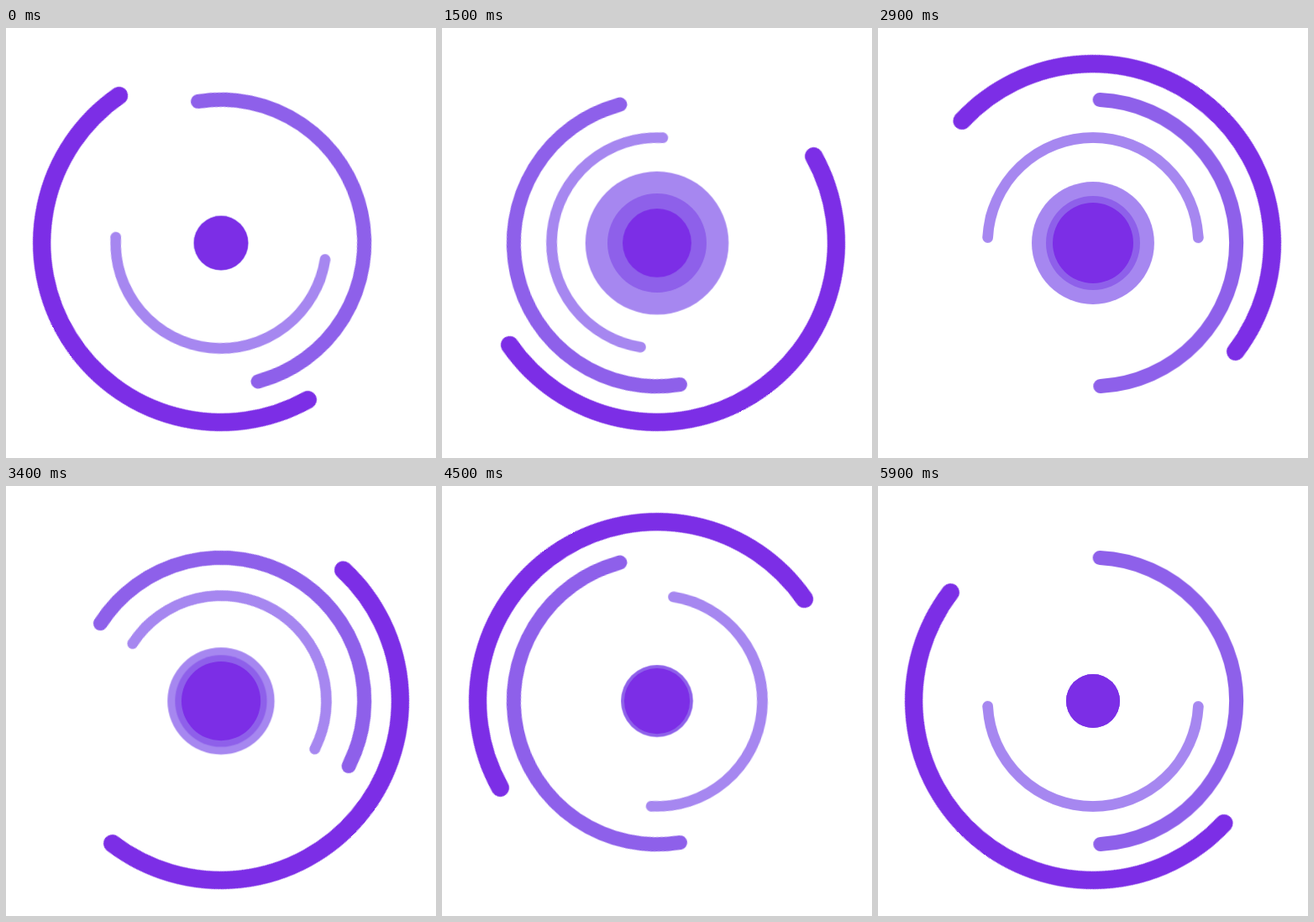
An HTML page for the animation above (6 s loop, 512 by 512 pixels).

```html
<!DOCTYPE html>
<html lang="en">
<head>
<meta charset="utf-8">
<title>Orbit loader</title>
<style>
  html, body { margin: 0; width: 100%; height: 100%; overflow: hidden; background: #fff; }
  svg { display: block; width: 100vw; height: 100vh; }
  path { fill: none; stroke-linecap: round; }
</style>
</head>
<body>
<svg viewBox="-256 -256 512 512"></svg>
<script>
const LOOP = 6000;
const LEAD = 100;
const DEEP = '#7c2ee6', MID = '#8e60ea', PALE = '#a687f0';

// Each arc is a half turn including its round caps; from = angle of its middle.
const arcs = [
  { r: 213.33, width: 21.33, color: DEEP, from: 130, turns: 3 },
  { r: 170.67, width: 17.07, color: MID, from: 0, turns: -2 },
  { r: 125.5, width: 12.8, color: PALE, from: 90, turns: 1 }
];

// Steps are [offset, radius], eased in and out between neighbours.
const discs = [
  { color: PALE, steps: [[0, 32], [0.25, 85.33], [1, 32]] },
  { color: MID, steps: [[0, 32], [0.25, 59], [0.5, 56], [1, 32]] },
  { color: DEEP, steps: [[0, 32], [0.5, 48], [1, 32]] }
];

const svg = document.querySelector('svg');

function add(tag, attrs) {
  const el = document.createElementNS('http://www.w3.org/2000/svg', tag);
  for (const name in attrs) el.setAttribute(name, attrs[name]);
  return svg.appendChild(el);
}

function loop(el, frames, duration) {
  el.animate(frames, { duration, delay: -LEAD, iterations: Infinity });
}

for (const { r, width, color, from, turns } of arcs) {
  const half = Math.PI / 2 - Math.asin(width / 2 / r);
  const x = r * Math.cos(half), y = r * Math.sin(half);
  const arc = add('path', {
    d: `M${x} ${-y}A${r} ${r} 0 0 1 ${x} ${y}`,
    stroke: color,
    'stroke-width': width
  });
  loop(arc, [
    { transform: `rotate(${from}deg)` },
    { transform: `rotate(${from + 360 * Math.sign(turns)}deg)` }
  ], LOOP / Math.abs(turns));
}

for (const { color, steps } of discs) {
  const disc = add('circle', { r: 32, fill: color });
  loop(disc, steps.map(([offset, r]) => ({
    offset,
    transform: `scale(${r / 32})`,
    easing: 'ease-in-out'
  })), LOOP);
}
</script>
</body>
</html>
```
